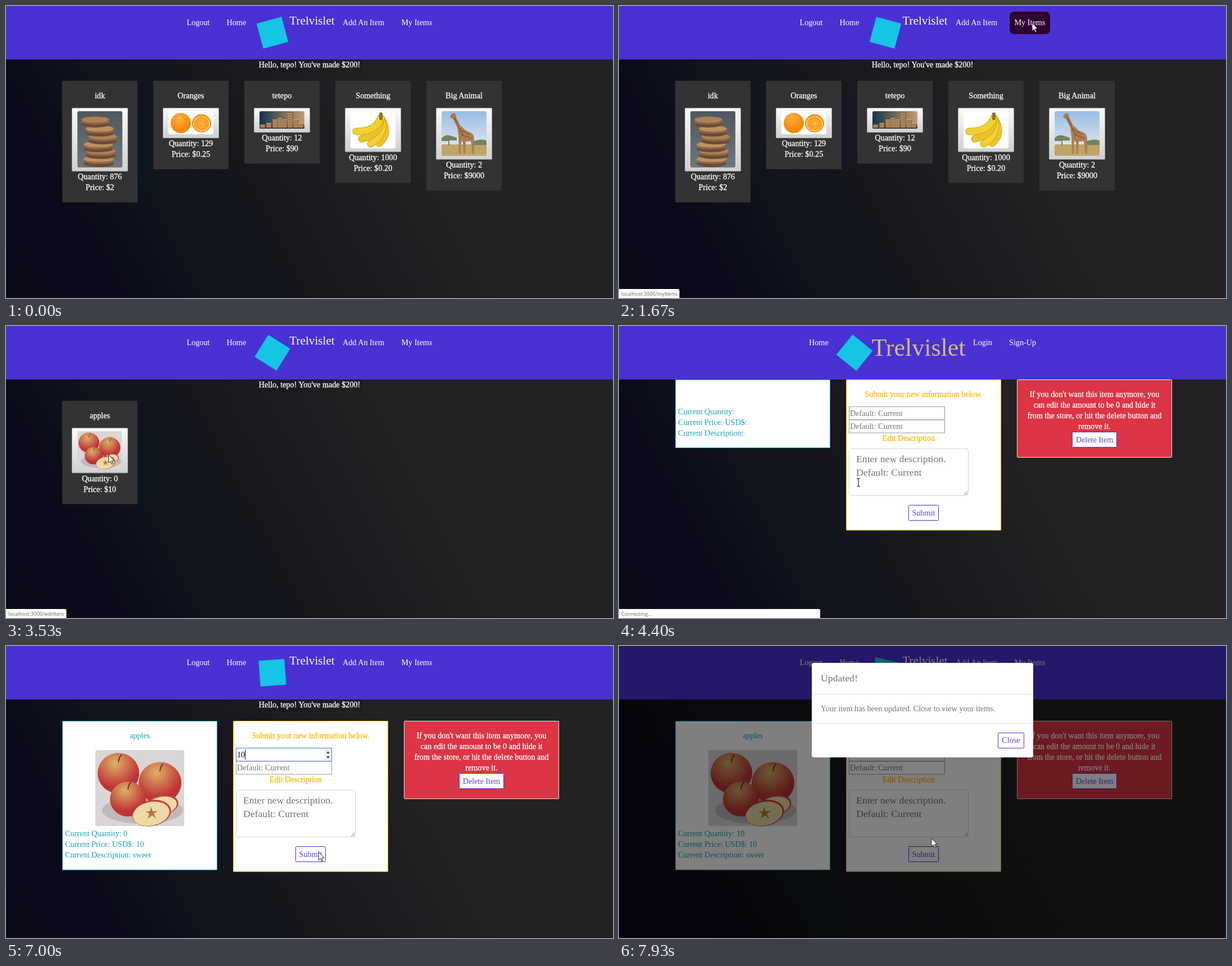
Recreate the animation shown at these times as an HTML page. Size 1080 by 519 pixels, loop 8 s.

```html
<!DOCTYPE html>
<html lang="en">
<head>
<meta charset="utf-8">
<title>Item shop</title>
<style>
  html, body { margin: 0; width: 100%; height: 100%; overflow: hidden; }
  svg {
    display: block; width: 1080px; height: 519px;
    background: linear-gradient(62deg, #0a0918, #0b0a1a 15%, #10151c 28%, #17171d 42%, #1c1b20 52%, #222 65%);
    font: 14.2px "Liberation Serif", serif;
  }
  .status { font: 9px "Open Sans", sans-serif; }
</style>
</head>
<body>
<svg id="stage" viewBox="0 0 1080 519"></svg>
<script>
const BRAND = 'Trelvislet', PURPLE = '#4931d4', TEAL = '#17a2b8', GOLD = '#ffb900', GREY = '#6c757d';

// ---- markup helpers
const text = (x, y, s, fill = '#fff', size = 14.2, extra = '') =>
  `<text x="${x}" y="${y}" fill="${fill}" font-size="${size}" ${extra}>${s}</text>`;
const mid = (x, y, s, fill, size, extra = '') => text(x, y, s, fill, size, 'text-anchor="middle" ' + extra);
const strong = (x, y, s, fill = '#fff') => mid(x, y, s, fill, 14.2, `stroke="${fill}" stroke-width=".3"`);
const rect = (x, y, w, h, fill, extra = '') =>
  `<rect x="${x}" y="${y}" width="${w}" height="${h}" fill="${fill}" ${extra}/>`;
const framed = (x, y, w, h, fill, line, r = 1) =>
  rect(x + .5, y + .5, w - 1, h - 1, fill, `stroke="${line}" rx="${r}"`);
const oval = (x, y, rx, ry, fill, extra = '') =>
  `<ellipse cx="${x}" cy="${y}" rx="${rx}" ry="${ry}" fill="${fill}" ${extra}/>`;
const path = (d, fill, extra = '') => `<path d="${d}" fill="${fill}" ${extra}/>`;
const line = (d, color, width) =>
  path(d, 'none', `stroke="${color}" stroke-width="${width}" stroke-linecap="round" stroke-linejoin="round"`);
const group = (id, body, extra = '') => `<g id="${id}" ${extra}>${body}</g>`;
const button = (x, y, w, label) =>
  framed(x, y, w, 28, '#fff', PURPLE) + mid(x + w / 2, y + 18.5, label, '#5846d4');

// ---- simplified photographs
const pictures = {
  cookies() {
    let s = rect(0, 0, 80, 100, 'url(#slate)', 'rx="3"');
    [[38, 87], [42, 73], [37, 61], [45, 47], [40, 33], [32, 17]].forEach(([x, y], i) => {
      s += oval(x, y + 6, 27 - i * .5, 6, '#6d4a31') + oval(x, y + 2, 26, 5, '#8b6257') +
        oval(x, y - 2, 27 - i * .5, 5.5, i % 2 ? '#ad8351' : '#bb915c');
    });
    return s;
  },
  oranges() {
    let s = rect(0, 0, 80, 41, '#fff', 'rx="3"') + oval(22, 21, 18, 18, 'url(#orange)');
    s += oval(59, 21.5, 17, 16, '#f58a07') + oval(59, 22, 15, 13.5, '#ffd48a') + oval(59, 22, 13.5, 12, '#ff9b1c');
    for (let a = 0; a < 180; a += 36)
      s += path('M46 22H72', 'none', `stroke="#ffc468" transform="rotate(${a} 59 22)"`);
    return s;
  },
  coins() {
    let s = rect(0, 0, 80, 31, 'url(#dusk)', 'rx="3"') + rect(0, 25, 80, 6, '#4a3324', 'rx="2"');
    [[6, 5], [17, 8], [28, 14], [37, 18], [45, 14], [55, 27], [65, 13], [74, 7]].forEach(([x, h]) => {
      s += rect(x - 4.5, 29 - h, 9, h, '#6f4b2b');
      for (let y = 0; y < h; y += 3) s += rect(x - 5, 27 - y, 9, 1.6, '#dcb883', 'rx=".8"');
    });
    return s;
  },
  bananas() {
    let s = rect(0, 0, 80, 66, '#fff', 'rx="3"');
    ['Q72 38 51 57', 'Q64 40 36 58', 'Q53 42 20 49', 'Q44 37 10 36'].forEach((curve, i) => {
      const d = 'M54 12' + curve;
      s += line(d, '#c09a1c', 13) + line(d, i % 2 ? '#f3d032' : '#eac426', 11.5);
    });
    return s + line('M54 5V13', '#8a7424', 6);
  },
  giraffe() {
    return rect(0, 0, 80, 79, 'url(#savanna)', 'rx="3"') + rect(0, 59, 80, 20, '#bda468', 'rx="2"') +
      path('M0 48q7-7 14-5l13 4v5H14v9h-2v-8H0zM54 55q14-7 26-3v8H54z', '#77805c') +
      line('M21 8L38 42', '#a8784c', 6) + path('M15 9l5-6 5 2 1 6-9 2z', '#a8784c') +
      path('M27 22L38 29Q41 34 47 36Q58 39 58 49V76h-3l-3-23-9 1-1 22h-3l-1-21-3-2-1 23h-3l-1-32z', '#ad7d50') +
      path('M23 12L38 44M33 33l18 9M37 42l16 6', 'none', 'stroke="#7a5030" stroke-width="2" stroke-dasharray="3 2"');
  },
  apples() {
    const apple = (x, y, r) => oval(x, y, r, r * .97, 'url(#apple)') + line(`M${x} ${y - r * .55}q1-8 5-12`, '#5a3520', 2);
    const slice = (x, y, rx, ry) => oval(x, y, rx, ry, '#bd4638', `transform="rotate(-12 ${x} ${y})"`) +
      oval(x - 1, y + 1, rx - 2, ry - 2, '#eedaa8', `transform="rotate(-12 ${x} ${y})"`);
    return rect(0, 0, 158, 135, '#dad6d6', 'rx="3"') + oval(84, 107, 72, 24, '#c0b8b9') +
      apple(41, 41, 37) + apple(115, 58, 38) + slice(118, 98, 30, 18) + apple(58, 87, 32) + slice(100, 112, 35, 23) +
      path('M97 109l2-8 3 8 9-1-7 5 4 9-7-6-8 6 3-9-7-4z', '#a97a38');
  }
};
const picture = (name, x, y, k = 1) => `<g transform="translate(${x} ${y}) scale(${k})">${pictures[name]()}</g>`;

// ---- page parts
const card = (col, title, pic, h, quantity, price, k = 1) => {
  const x = 100 + 162 * col, c = x + 67, end = 193.5 + h;
  return rect(x, 133, 134, h + 116, '#333') + strong(c, 164, title) +
    framed(x + 17, 181, 100, h + 13, 'url(#paper)', '#aaa') + picture(pic, x + 27, 187, k) +
    strong(c, end + 14.5, 'Quantity: ' + quantity) + strong(c, end + 33.5, 'Price: $' + price);
};

const tabs = { logout: [313, 58], home: [384, 52], add: [591, 91], mine: [695, 72] };
const memberNav = Object.entries(tabs).map(([k, [x, w]]) => rect(x, 10, w, 40, '#300032', `id="${k}" rx="8"`)).join('') +
  text(321.5, 34, 'Logout') + text(392.5, 34, 'Home') + mid(544.5, 33, BRAND, '#fff', 21.2) +
  text(599, 34, 'Add An Item') + text(703.5, 34, 'My Items') +
  strong(540, 108.5, "Hello, tepo! You've made $200!");
const guestNav = text(338, 34, 'Home') + mid(533, 53, BRAND, '#d0be82', 44) + text(630, 34, 'Login') + text(694, 34, 'Sign-Up');

const warning = ["If you don't want this item anymore, you", 'can edit the amount to be 0 and hide it',
  'from the store, or hit the delete button and', 'remove it.'];
const input = (y, extra) => rect(409.5, y + .5, 170, 23, '#fff', 'stroke="#999" ' + extra);
const editForm =
  framed(404, 95, 276, 268.5, '#fff', '#ffc107') + strong(542, 126, 'Submit your new information below.', GOLD) +
  input(143, 'id="field"') + input(166.5, '') +
  text(411, 183, 'Default: Current', '#757575') + strong(515.5, 204, 'Edit Description', GOLD) +
  framed(409, 217.5, 213, 84.5, '#fff', '#ced4da', 4) +
  text(422, 242, 'Enter new description.', GREY, 17.7) + text(422, 265.5, 'Default: Current', GREY, 17.7) +
  path('M614 300l6-6M618 300l2-2', 'none', 'stroke="#666"') + button(515, 318, 54, 'Submit') +
  framed(708, 95, 276, 139, '#dc3545', '#eed') +
  warning.map((s, i) => strong(846, 126 + 19 * i, s)).join('') + button(806, 188, 80, 'Delete Item');
const details = (y, a, b, c) => text(105, y, 'Current Quantity: ' + a, TEAL) +
  text(105, y + 19, 'Current Price: USD$: ' + b, TEAL) + text(105, y + 38, 'Current Description: ' + c, TEAL);
const spinner = (id, y) => group(id, rect(567, y, 12, 20, '#eee') +
  path(`M570 ${y + 8}l3-4 3 4zM570 ${y + 13}l3 4 3-4z`, '#444'));

const stops = (a, b) => `<stop stop-color="${a}"/><stop offset="1" stop-color="${b}"/>`;
const gradient = (id, a, b, dir = 'x2="0" y2="1"') => `<linearGradient id="${id}" ${dir}>${stops(a, b)}</linearGradient>`;
const ball = (id, a, b) => `<radialGradient id="${id}" cx=".42" cy=".25" r=".6">${stops(a, b)}</radialGradient>`;

stage.innerHTML = `<defs>${gradient('paper', '#fafafa', '#cfcfcf') + gradient('slate', '#50585f', '#6d767c') +
  gradient('dusk', '#143448', '#c39c70', '') + gradient('savanna', '#98bde4', '#eef0ee') +
  ball('apple', '#dcb266', '#bf3236') + ball('orange', '#fdb040', '#f5890c')}</defs>` +
  rect(0, 0, 1080, 95, PURPLE) + rect(0, 518, 1080, 1, '#0c0c0e') +
  rect(-23, -23, 46, 46, '#16c4e4', 'id="logo"') +
  group('member', memberNav) + group('guest', guestNav) +
  group('shop', card(0, 'idk', 'cookies', 100, 876, 2) + card(1, 'Oranges', 'oranges', 41, 129, '0.25') +
    card(2, 'tetepo', 'coins', 31, 12, 90) + card(3, 'Something', 'bananas', 65.5, 1000, '0.20') +
    card(4, 'Big Animal', 'giraffe', 79, 2, 9000)) +
  group('items', card(0, 'apples', 'apples', 67.5, 0, 10, .5)) +
  group('empty', framed(100, 95, 276, 122, '#fff', TEAL) + details(157, '', '', '')) +
  group('form', editForm) +
  group('loaded', framed(100, 133, 276, 265.5, '#fff', TEAL) + mid(238, 164, 'apples', TEAL) + picture('apples', 159, 185) +
    details(338, '<tspan id="quantity"></tspan>', 10, 'sweet') + spinner('spin1', 183) + spinner('spin2', 206.5)) +
  text(411, 160, '', '#757575', 14.2, 'id="value"') + rect(0, 184, 1, 18, '#000', 'id="caret"') +
  rect(0, 0, 1080, 519, '#000', 'id="shade"') +
  group('modal', rect(343, 30, 394, 168, '#fff', 'rx="4"') + text(359, 63, 'Updated!', GREY, 17.7) +
    path('M343 86H737M343 137.5H737', 'none', 'stroke="#dee2e6"') +
    text(359, 116, 'Your item has been updated. Close to view your items.', GREY) + button(674, 154, 47, 'Close')) +
  group('status', rect(-4, 503, 0, 20, '#fff', 'id="statusBox" rx="3"') + '<text id="statusText" class="status" x="4" y="515" fill="#666"/>') +
  group('arrow', path('M0 0v14.5l3.3-3 2.3 5.2 2.2-1-2.3-5h4.6z', '#fff', 'stroke="#111" stroke-width=".9"')) +
  group('beam', path('M-3-7h2q1 0 1 1v12q0 1-1 1h-2M3-7h-2q-1 0-1 1M3 7h-2q-1 0-1-1', 'none', 'stroke="#222" stroke-width="1.2"'));

const el = id => document.getElementById(id);
const show = (id, on) => el(id).style.display = on ? '' : 'none';
const set = (id, attrs) => Object.entries(attrs).forEach(([k, v]) => el(id).setAttribute(k, v));
const clamp = v => Math.max(0, Math.min(1, v));

// ---- timeline: time, x, y of the pointer
const route = [[0, 1079, 518], [250, 1079, 518], [750, 640, 34], [870, 670, 30], [930, 712, 8], [1250, 850, 60],
  [1600, 735, 30], [2000, 735, 30], [2200, 640, 32], [2470, 357, 206], [2700, 357, 206], [3300, 180, 230],
  [4000, 190, 225], [4380, 426, 278], [4700, 426, 278], [5150, 470, 194], [5500, 470, 194], [5930, 507, 214],
  [6250, 507, 214], [6900, 556, 366], [7600, 557, 367], [7930, 556, 342], [8001, 556, 342]];
const statuses = [[1000, 1550, 'localhost:3000/addItem'], [1620, 2050, 'localhost:3000/myItems'],
  [2200, 2650, 'localhost:3000/addItem'], [3450, 4395, 'localhost:3000/editItem'], [4395, 4750, 'Connecting...']];

function pointer(t) {
  const i = Math.max(1, route.findIndex(p => p[0] > t));
  const [t0, x0, y0] = route[i - 1], [t1, x1, y1] = route[i];
  const u = clamp((t - t0) / (t1 - t0)), k = u * u * (3 - 2 * u);
  return [x0 + (x1 - x0) * k, y0 + (y1 - y0) * k];
}

function draw(t) {
  const guest = t >= 4395 && t < 4750, loaded = t >= 4750, edit = guest || loaded;
  const shift = loaded ? 38 : 0;
  show('member', !guest);
  show('guest', guest);
  show('shop', t < 1950);
  show('items', t >= 2850 && t < 4395);
  show('empty', guest);
  show('form', edit);
  show('loaded', loaded);
  set('form', { transform: `translate(0 ${shift})` });

  // the spin pauses while the edit page loads
  const angle = t < 2600 ? -15 + t * .018 : Math.max(32, 39 + (t - 4400) * .018);
  set('logo', { transform: `translate(${guest ? 419 : 474} 47.5) rotate(${angle})` });

  const [x, y] = pointer(t), [hx, hy] = pointer(t - 60);
  for (const [id, [left, w]] of Object.entries(tabs))
    show(id, hx > left && hx < left + w && hy > 10 && hy < 50);

  const focused = t >= 5150 && t < 7350, typed = t < 5700 ? '' : t < 5990 ? '1' : '10';
  const overInput = n => loaded && x > 409 && x < 580 && y > 181 + 24 * n && y < 205 + 24 * n;
  const overArea = edit && x > 409 && x < 622 && y > 218 + shift && y < 302 + shift;
  const beam = overInput(0) || overInput(1) || overArea;
  show('spin1', focused || overInput(0));
  show('spin2', overInput(1));
  set('field', { stroke: focused ? '#3c78d8' : '#999' });
  show('value', edit);
  el('value').textContent = typed || 'Default: Current';
  set('value', { y: 160 + shift, fill: typed ? '#111' : '#757575' });
  el('quantity').textContent = t < 7450 ? '0' : '10';
  const lastKey = t < 5700 ? 5150 : t < 5990 ? 5700 : 5990;
  show('caret', focused && (t - lastKey) % 1000 < 500);
  set('caret', { x: 411 + typed.length * 7.1 });

  set('shade', { opacity: .5 * clamp((t - 7565) / 150) });
  const slide = clamp((t - 7640) / 300);
  show('modal', t > 7670);
  set('modal', { opacity: clamp((t - 7670) / 150), transform: `translate(0 ${-50 * (1 - slide) ** 2})` });

  const status = statuses.find(([a, b]) => t >= a && t < b);
  show('status', status);
  if (status) {
    el('statusText').textContent = status[2];
    set('statusBox', { width: guest ? 362 : 111.5 });
  }

  show('beam', beam);
  show('arrow', !beam);
  set(beam ? 'beam' : 'arrow', { transform: `translate(${x} ${y})` });
}

const start = performance.now();
(function tick() {
  draw((performance.now() - start) % 8000);
  requestAnimationFrame(tick);
})();
</script>
</body>
</html>
```
